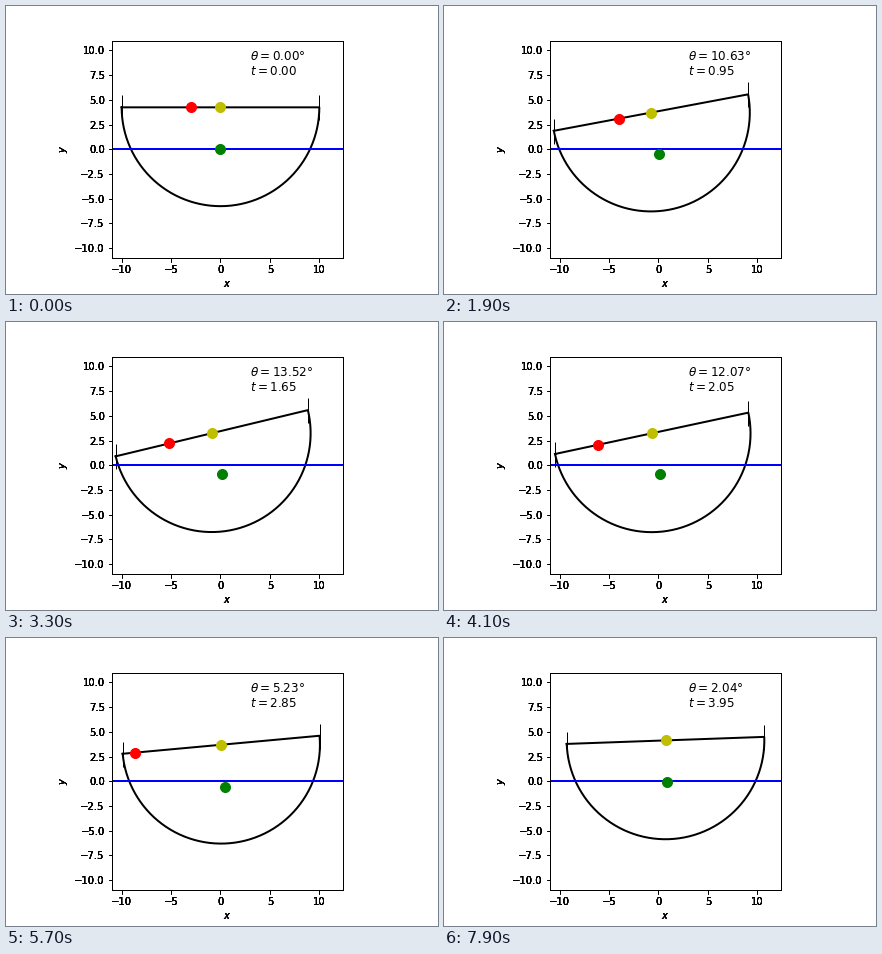
Animation, 432 px wide and 288 px high, one loop 8000 ms. Source, as a matplotlib script:

```python
import numpy as np
import matplotlib.pyplot as plt
from matplotlib.animation import FuncAnimation

# Half-disc boat with a load sliding freely along its deck
R, G = 10.0, 9.81
H = 4 * R / (3 * np.pi)                             # circle centre above centre of mass
INERTIA = 0.5 * R**2 * (1 - 32 / (9 * np.pi**2))    # per unit boat mass
LOAD = 0.08                                         # load mass / boat mass
FRAMES, DT, SUB = 80, 0.05, 10


def rates(state):
    theta, x, y, s, w, vx, vy, vs = state
    sin, cos = np.sin(theta), np.cos(theta)
    gamma = 2 * np.arccos((y + H * cos) / R)
    lift = 2 * G * (gamma - np.sin(gamma)) / np.pi
    normal = LOAD * G * cos
    return np.array([
        w, vx, vy, vs,
        (-lift * H * sin - normal * s) / INERTIA,
        normal * sin,
        lift - G - normal * cos,
        -G * sin,
    ])


def rk4(state, dt):
    k1 = rates(state)
    k2 = rates(state + dt / 2 * k1)
    k3 = rates(state + dt / 2 * k2)
    k4 = rates(state + dt * k3)
    return state + dt / 6 * (k1 + 2 * k2 + 2 * k3 + k4)


def simulate():
    state = np.array([0, 0, 0, -3.0, 0.2, 0, 0, 0])
    poses = []
    for _ in range(FRAMES):
        poses.append(state[:4])
        for _ in range(SUB):
            state = rk4(state, DT / SUB)
    return poses


poses = simulate()

plt.rcParams.update({"font.family": "DejaVu Sans", "font.size": 10})
fig = plt.figure(figsize=(6, 4), dpi=72, facecolor="white")


def add_frame(name, face):
    ax = fig.add_axes([0.125, 0.125, 0.775, 0.755], label=name, facecolor=face)
    ax.set(xlim=(-11, 12.4), ylim=(-11, 11), aspect="equal",
           xticks=np.arange(-10, 11, 5), yticks=np.arange(-10, 11, 2.5),
           xlabel="$x$", ylabel="$y$")
    return ax


ax = add_frame("main", "white")
# Stacked transparent axes give the labels their heavy look
for i in range(4):
    add_frame(f"heavy{i}", "none")

hull, = ax.plot([], [], "k-", lw=2)
posts, = ax.plot([], [], "k|", ms=25, mew=1)
ax.axhline(0, color="b", lw=2)
mass, = ax.plot([], [], "o", color="g", ms=10)
middle, = ax.plot([], [], "o", color="y", ms=10)
load, = ax.plot([], [], "o", color="r", ms=10)
angle_text = ax.text(3, 9, "", fontsize=12)
time_text = ax.text(3, 7.5, "", fontsize=12)

arc = np.linspace(np.pi, 2 * np.pi, 181)


def update(i):
    theta, x, y, s = poses[i]
    sin, cos = np.sin(theta), np.cos(theta)
    cx, cy = x - H * sin, y + H * cos
    hx, hy = cx + R * np.cos(arc + theta), cy + R * np.sin(arc + theta)
    hull.set_data(np.append(hx, hx[0]), np.append(hy, hy[0]))
    posts.set_data(hx[[0, -1]], hy[[0, -1]])
    mass.set_data([x], [y])
    middle.set_data([cx], [cy])
    load.set_data([cx + s * cos], [cy + s * sin])
    angle_text.set_text(rf"$\theta={np.degrees(theta):.2f}$°")
    time_text.set_text(f"$t={i * DT:.2f}$")
    return hull, posts, mass, middle, load, angle_text, time_text


anim = FuncAnimation(fig, update, frames=FRAMES, interval=100,
                     repeat=True, repeat_delay=0, blit=False)
plt.show()
```
